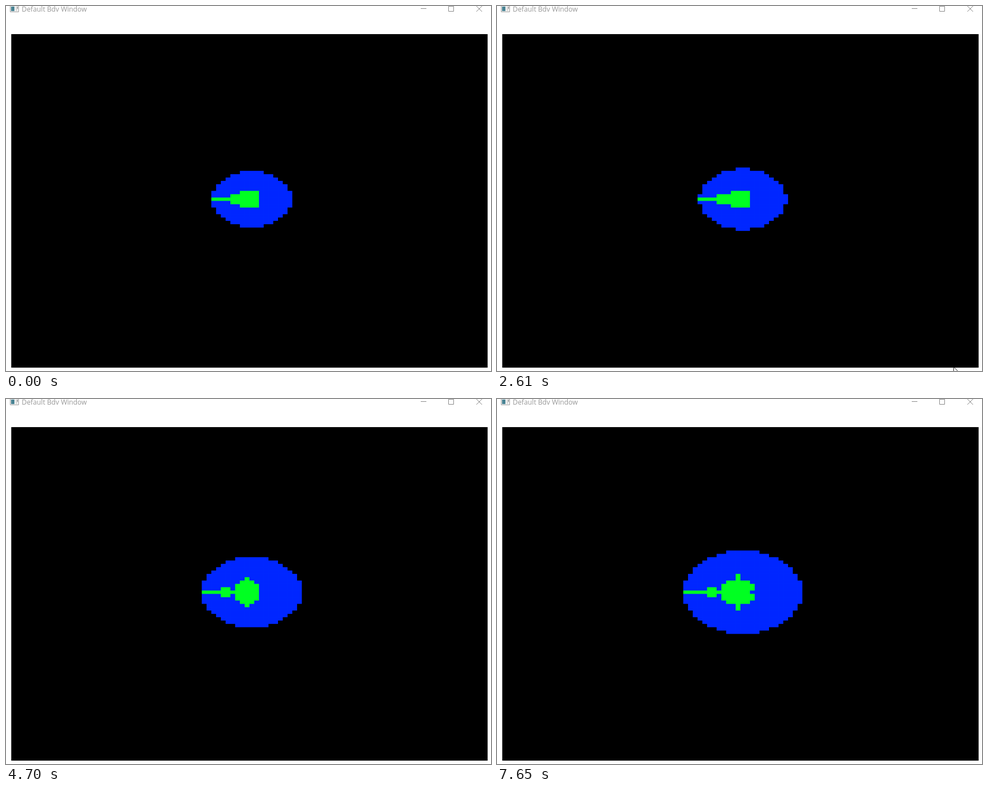
An HTML page with a canvas for the animation above (8000 ms loop, 863 by 649 pixels).

```html
<!DOCTYPE html>
<html lang="en">
<head>
<meta charset="utf-8">
<title>Default Bdv Window</title>
<style>
  html, body { margin: 0; width: 863px; height: 649px; overflow: hidden; background: #fff; }
  canvas, svg { position: absolute; left: 0; top: 0; }
  text { font: 12.25px "Open Sans", sans-serif; fill: #999; }
</style>
</head>
<body>
<canvas id="view" width="863" height="649"></canvas>
<svg width="863" height="50" fill="none" stroke="#8a8a8a">
  <text x="28" y="10" stroke="none">Default Bdv Window</text>
  <path d="M7.5 -2V10.5H22.5V-2" stroke="#a0a0a0" fill="#f4f4f4"/>
  <path d="M9 1h6v8h-6z" fill="#4a8494" stroke="none"/>
  <path d="M17 1h3v8h-3z" fill="#dcdcdc" stroke="none"/>
  <path d="M20.5 1v4" stroke="#777"/>
  <path d="M738 4.5h10M787.5 .5h9v9h-9zM837 0l10 10M847 0l-10 10"/>
</svg>
<script>
const ctx = document.getElementById('view').getContext('2d');
const LOOP = 8000, CELLS = 100, LIMIT = 100;
const LEFT = 9.35, TOP = 50, CELL_W = 8.476, CELL_H = 5.93;
const ARROW = new Path2D('M-.4 -1V13L2.8 10.1L4.9 15L7.4 13.9L5.3 9.2H9.6Z');

function escapeCount(cx, cy) {
  let x = 0, y = 0, n = 0;
  while (n < LIMIT) {
    [x, y] = [x * x - y * y + cx, 2 * x * y + cy];
    if (x * x + y * y > 4) break;
    n++;
  }
  return n;
}

// The timer ticks about once a second; after 5 s it runs slightly ahead
function ticks(time) {
  const lead = time > 5000 ? 75 : 0;
  return Math.floor((time + lead - 670) / 1007) + 1;
}

// Mandelbrot set; step is the size of one cell in hundredths
function drawSet(step) {
  ctx.fillStyle = '#000';
  ctx.fillRect(LEFT, TOP, CELLS * CELL_W, CELLS * CELL_H);
  ctx.globalCompositeOperation = 'lighter'; // cells sharing a pixel add up without seams
  for (let j = 0; j < CELLS; j++) {
    for (let i = 0; i < CELLS; i++) {
      const n = escapeCount((i - 50) * step / 100, (j - 49) * step / 100);
      if (!n) continue;
      ctx.fillStyle = n === LIMIT ? '#00ff21' : '#0026ff';
      ctx.fillRect(LEFT + i * CELL_W, TOP + j * CELL_H, CELL_W, CELL_H);
    }
  }
  ctx.globalCompositeOperation = 'source-over';
}

const progress = (time, from, to) => Math.min(1, Math.max(0, (time - from) / (to - from)));

// The pointer rises into view, rests, then sinks away in three moves
function drawPointer(time) {
  if (time < 430 || time >= 2830) return;
  const rise = progress(time, 430, 820);
  const sink = progress(time, 1870, 2000) + progress(time, 2200, 2400) + progress(time, 2610, 2690);
  ctx.save();
  ctx.translate(820 - 3 * rise - 2 * sink, 646 - 14 * rise + 16 * sink / 3);
  ctx.fillStyle = '#fff';
  ctx.strokeStyle = '#000';
  ctx.lineWidth = 0.85;
  ctx.fill(ARROW);
  ctx.stroke(ARROW);
  ctx.restore();
}

function draw() {
  const time = performance.now() % LOOP;
  ctx.clearRect(0, 0, 863, 649);
  drawSet(24 - ticks(time));
  drawPointer(time);
  requestAnimationFrame(draw);
}
draw();
</script>
</body>
</html>
```
